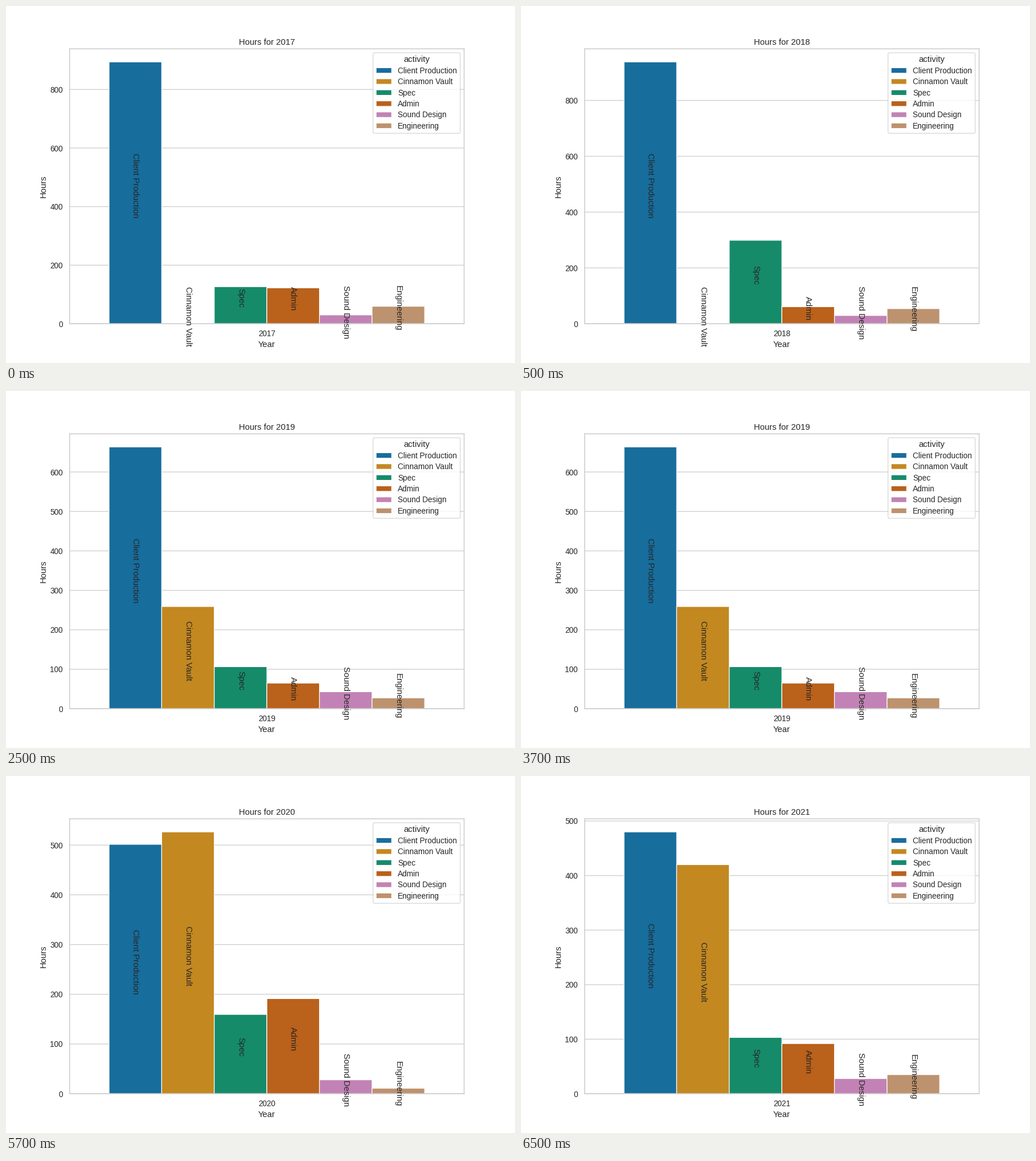
A matplotlib script for the animation above (8 s loop, 894 px wide and 626 px high).

```python
import colorsys

import matplotlib.pyplot as plt
from matplotlib.animation import FuncAnimation
from matplotlib.colors import to_rgb

DPI = 89.4
STEP_MS = 500
FRAMES = 16
FIRST_YEAR = 2017
BAR_WIDTH = 0.8 / 6

ACTIVITIES = ["Client Production", "Cinnamon Vault", "Spec",
              "Admin", "Sound Design", "Engineering"]
PALETTE = ["#0173B2", "#DE8F05", "#029E73", "#D55E00", "#CC78BC", "#CA9161"]
HOURS = [
    [894, 0, 126.5, 122.5, 30, 59.5],
    [938, 0, 299, 61, 29.5, 54],
    [663.5, 259, 106.5, 65, 43, 27.5],
    [501.5, 526.5, 159.5, 191.3, 28, 11],
    [480, 420, 103.2, 92, 27.8, 35],
]

plt.rcParams.update({
    "font.family": "Liberation Sans",
    "font.size": 12,
    "axes.titlesize": 12,
    "axes.labelsize": 12,
    "xtick.labelsize": 11,
    "ytick.labelsize": 11,
    "legend.fontsize": 11,
    "legend.title_fontsize": 12,
    "legend.labelspacing": 0.395,
    "text.color": ".15",
    "axes.labelcolor": ".15",
    "xtick.color": ".15",
    "ytick.color": ".15",
    "axes.edgecolor": ".8",
    "axes.linewidth": 1.25,
    "axes.axisbelow": True,
    "grid.color": ".8",
    "grid.linewidth": 1,
    "patch.linewidth": 1,
    "path.snap": False,
    "xtick.bottom": False,
    "ytick.left": False,
    "xtick.major.size": 6,
    "ytick.major.size": 6,
    "xtick.major.pad": 2.6,
})


def soften(color, saturation=0.75):
    h, l, s = colorsys.rgb_to_hls(*to_rgb(color))
    return colorsys.hls_to_rgb(h, l, s * saturation)


COLORS = [soften(c) for c in PALETTE]

fig, ax = plt.subplots(figsize=(10, 7.00225), dpi=DPI)


def draw_year(index):
    hours = HOURS[index]
    year = FIRST_YEAR + index
    ax.clear()
    ax.grid(axis="y")
    for k, (name, value, color) in enumerate(zip(ACTIVITIES, hours, COLORS)):
        x = (k - 2.5) * BAR_WIDTH
        ax.bar(x, value, BAR_WIDTH, color=color, edgecolor="w", label=name)
        ax.annotate(name, (x, value / 2), xytext=(0, 10),
                    textcoords="offset points", rotation=270,
                    ha="center", va="center", annotation_clip=False)
    ax.set(xlim=(-0.5, 0.5), ylim=(0, max(hours) * 1.05),
           title=f"Hours for {year}", xlabel="Year", ylabel="Hours")
    ax.set_xticks([0], [str(year)])
    ax.legend(title="activity", loc="upper right")


def update(frame):
    # The first year shows for one step, every later one for up to four.
    draw_year((frame + 3) // 4)
    return []


anim = FuncAnimation(fig, update, frames=FRAMES, interval=STEP_MS,
                     init_func=lambda: update(0), repeat=True, repeat_delay=0)

plt.show()
```
